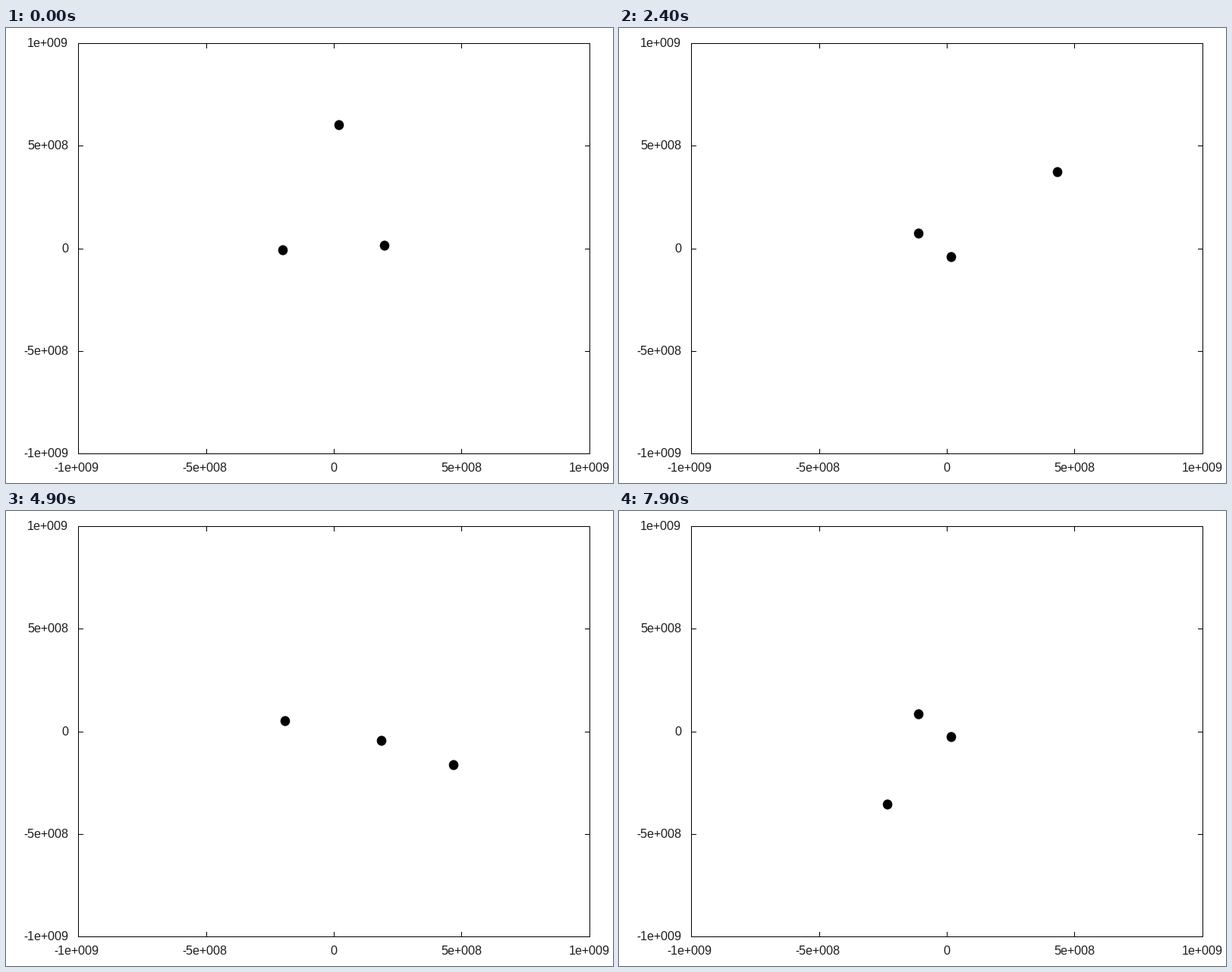
Animation, 800 px wide and 600 px high, one loop 8000 ms. Source, as a matplotlib script:

```python
import numpy as np
import matplotlib.pyplot as plt
from matplotlib.animation import FuncAnimation
from matplotlib.patches import Ellipse, Rectangle

W, H, DPI = 800, 600, 100
FRAMES, STEP = 80, 100
SUB = 5                                 # simulation steps per frame
DT = STEP / 1000 / SUB

LEFT, RIGHT, TOP, BOTTOM = 95, 769, 20, 561
SCALE = np.array([1, (RIGHT - LEFT) / (BOTTOM - TOP)])   # pixels to equal units

# Inner pair: Kepler ellipse that starts at its far point
ECC, PERIOD = 0.436, 5.485
SEMI = 134.8 / (1 + ECC)
SHARE = 0.4124                          # mass share of the lighter body
GM = (2 * np.pi / PERIOD) ** 2 * SEMI ** 3

# Outer body: start pixel and a few points (time in s, x, y) it must pass
START = (432.2, 128.1)
PASSES = [(2.4, 578, 190), (4.9, 590, 335), (6.1, 515, 388), (7.9, 354, 387)]


def pair(t):
    """Pixel paths of the heavier and the lighter inner body."""
    mean = 2 * np.pi * t / PERIOD
    u = mean
    for _ in range(12):
        u = u - (u + ECC * np.sin(u) - mean) / (1 + ECC * np.cos(u))
    rel = np.stack([SEMI * (np.cos(u) + ECC),
                    -SEMI * np.sqrt(1 - ECC**2) * np.sin(u)], axis=-1) / SCALE
    centre = np.stack([0 * t + 420.3, 290.4 - 0.6 * t], axis=-1)
    return centre - SHARE * rel, centre + (1 - SHARE) * rel


heavy, light = pair(np.arange((FRAMES + 1) * SUB) * DT)


def orbit(launch):
    """Leapfrog path of the light outer body; launch = vx, vy, pull."""
    pos, vel = np.array(START), np.array(launch[:2])
    path = []
    for a, b in zip(heavy, light):
        path.append(pos)
        for body, mass in ((a, 1 - SHARE), (b, SHARE)):
            d = body - pos
            dist = np.hypot(*(d * SCALE))
            vel = vel + launch[2] * GM * mass * d / dist**3 * DT * (
                0.5 if len(path) == 1 else 1)
        pos = pos + vel * DT
    return np.array(path)


def aim(launch, rounds=5):
    """Least-squares launch that meets the given passes."""
    passes = np.array(PASSES)
    when = np.rint(passes[:, 0] / DT).astype(int) + SUB
    launch = np.array(launch, float)
    for _ in range(rounds):
        here = orbit(launch)[when]
        slope = [(orbit(launch + d)[when] - here).ravel() / 1e-3
                 for d in np.eye(3) * 1e-3]
        miss = (passes[:, 1:] - here).ravel()
        launch += np.linalg.lstsq(np.array(slope).T, miss, rcond=None)[0]
    return launch


paths = heavy, light, orbit(aim((68.8, 0, 1)))

plt.rcParams["text.hinting"] = "native"
plt.rcParams["text.hinting_factor"] = 1
fig = plt.figure(figsize=(W / DPI, H / DPI), dpi=DPI, facecolor="white")
ax = fig.add_axes([0, 0, 1, 1])
ax.set_xlim(0, W)
ax.set_ylim(H, 0)
ax.axis("off")


def bar(x, y, w, h):
    ax.add_patch(Rectangle((x, y), w, h, fc="black", lw=0, antialiased=False))


def label(x, y, text, ha):
    ax.text(x, y, text, ha=ha, va="baseline", color="#1a1a1a",
            family="Liberation Sans", size=16 * 72 / DPI)


for y in (TOP, BOTTOM):
    bar(LEFT, y, RIGHT - LEFT + 1, 1)
for x in (LEFT, RIGHT):
    bar(x, TOP, 1, BOTTOM - TOP + 1)

for i, text in enumerate(["-1e+009", "-5e+008", "0", "5e+008", "1e+009"]):
    x = round(LEFT + (RIGHT - LEFT) * i / 4)
    y = int(BOTTOM - (BOTTOM - TOP) * i / 4 + 0.5)
    bar(x, TOP, 1, 7)
    bar(x, BOTTOM - 6, 1, 7)
    bar(LEFT, y, 7, 1)
    bar(RIGHT - 6, y, 7, 1)
    label(x - 2 if text[0] == "-" else x, 585, text, "center")
    label(82, y + 5, text, "right")

dots = [ax.add_patch(Ellipse((0, 0), 12.6, 13.2, fc="black", lw=0))
        for _ in paths]


def update(i):
    for dot, path in zip(dots, paths):
        dot.center = tuple(np.rint(path[(i + 1) * SUB]))
    return dots


anim = FuncAnimation(fig, update, frames=FRAMES, interval=STEP,
                     init_func=lambda: dots, repeat=True, repeat_delay=0)
plt.show()
```
